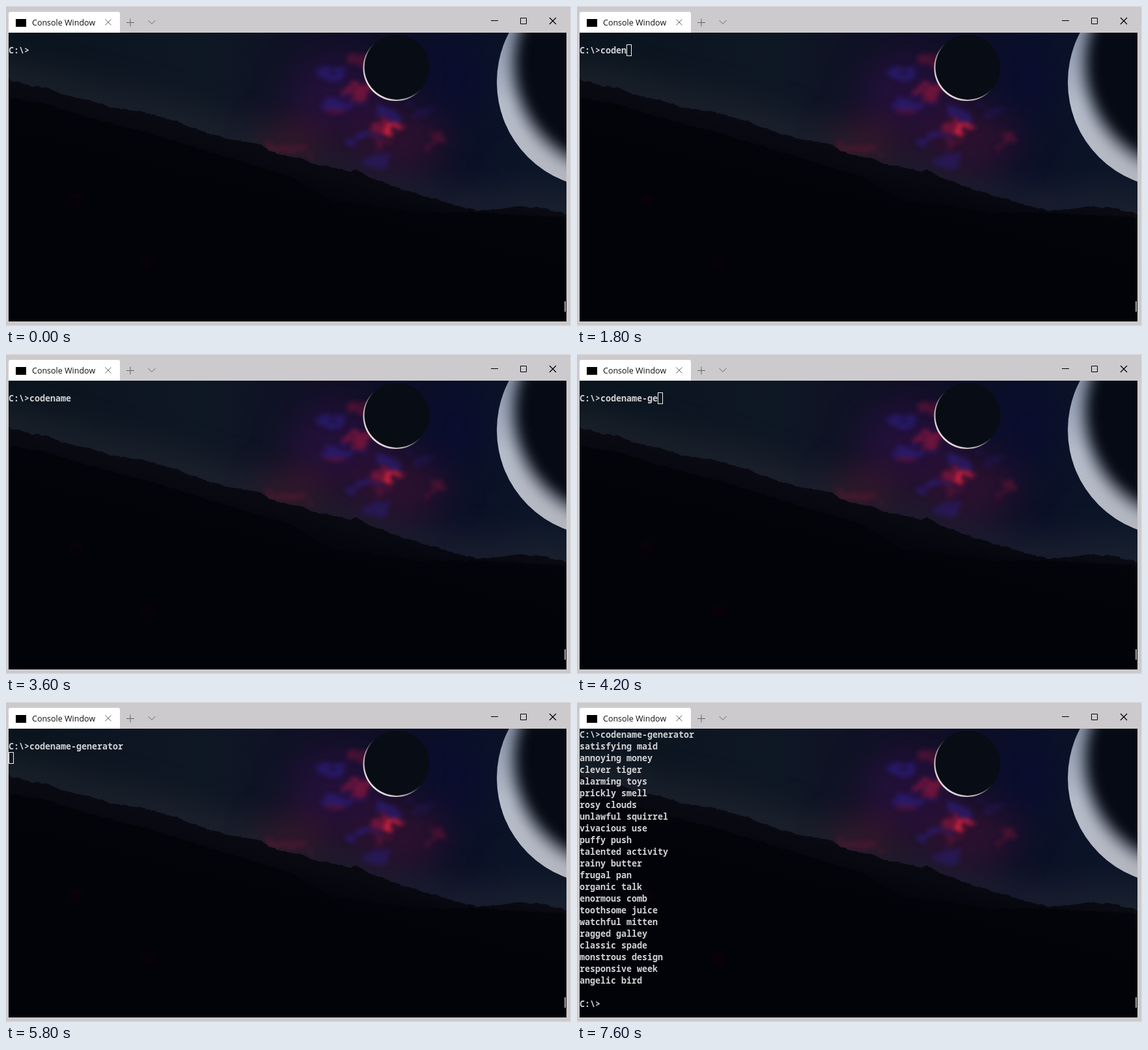
Recreate the animation shown at these times as an HTML page. Size 868 by 492 pixels, loop 8 s.

```html
<!DOCTYPE html>
<html lang="en">
<head>
<meta charset="utf-8">
<title>Terminal</title>
<style>
  html, body { margin: 0; width: 868px; height: 492px; overflow: hidden; background: #cdcacd; }
  svg, #screen { position: absolute; left: 0; top: 0; }
  filter { color-interpolation-filters: sRGB; }
  #screen {
    margin: 0; left: 4px; top: 41px; width: 857px; height: 444px; overflow: hidden;
    font: 600 13.333px/18px "Noto Sans Mono", "DejaVu Sans Mono", monospace;
    font-variant-ligatures: none; color: #d2d2d4;
  }
  #cursor {
    position: absolute; box-sizing: border-box; width: 8px; height: 18px;
    border: 1px solid #f4f4f4;
  }
  .tab { font: 12.5px "Open Sans", "Noto Sans", sans-serif; fill: #111; }
</style>
</head>
<body>
<svg width="868" height="492" viewBox="0 0 868 492">
  <defs>
    <clipPath id="view"><rect x="4" y="41" width="857" height="444"/></clipPath>
    <linearGradient id="sky">
      <stop offset="0" stop-color="#0a141e"/>
      <stop offset=".35" stop-color="#0e1724"/>
      <stop offset=".58" stop-color="#100f25"/>
      <stop offset=".78" stop-color="#0a0f27"/>
      <stop offset="1" stop-color="#0c1728"/>
    </linearGradient>
    <linearGradient id="land" gradientUnits="userSpaceOnUse" x1="430" y1="215" x2="402" y2="330">
      <stop offset="0" stop-color="#0a0a13"/>
      <stop offset=".5" stop-color="#05060d"/>
      <stop offset="1" stop-color="#020309"/>
    </linearGradient>
    <linearGradient id="planet" gradientUnits="userSpaceOnUse" x1="780" y1="41" x2="830" y2="270">
      <stop offset="0" stop-color="#8f9bb0"/>
      <stop offset=".45" stop-color="#b6bdca"/>
      <stop offset="1" stop-color="#b4b7c0"/>
    </linearGradient>
    <linearGradient id="rim" gradientUnits="userSpaceOnUse" x1="566" y1="130" x2="612" y2="84">
      <stop offset="0" stop-color="#e6dadc"/>
      <stop offset=".45" stop-color="#a89ca4"/>
      <stop offset=".8" stop-color="#0b0f18"/>
    </linearGradient>
    <clipPath id="disc"><circle cx="917" cy="117" r="163"/></clipPath>
    <filter id="soft" filterUnits="userSpaceOnUse" x="-100" y="-60" width="1070" height="600"><feGaussianBlur stdDeviation="26"/></filter>
    <filter id="shade" x="-20%" y="-20%" width="140%" height="140%"><feGaussianBlur stdDeviation="9"/></filter>
    <filter id="cloud" filterUnits="userSpaceOnUse" x="360" y="41" width="380" height="260">
      <feTurbulence type="fractalNoise" baseFrequency=".035 .06" numOctaves="4" seed="7"/>
      <feDisplacementMap in="SourceGraphic" scale="44" xChannelSelector="R" yChannelSelector="G"/>
      <feGaussianBlur stdDeviation="3.500"/>
    </filter>
    <filter id="rough" filterUnits="userSpaceOnUse" x="-10" y="90" width="890" height="420">
      <feTurbulence type="fractalNoise" baseFrequency=".09" numOctaves="2" seed="3"/>
      <feDisplacementMap in="SourceGraphic" scale="5" xChannelSelector="R" yChannelSelector="G"/>
    </filter>
    <path id="ridge" d="M-12 109L4 113 40 123 60 125 85 135 135 147 170 158 205 161 240 172 265 178 300 192 345 205 388 212 415 227 432 231 458 235 470 242 500 248 530 255 538 251 560 264 600 279 640 291 680 303 725 315 760 312 785 308 830 311 861 320 880 324V510H-12Z"/>
  </defs>

  <path d="M0 .5H868" stroke="#e0dee0"/>
  <path d="M867.5 0V492M0 491.5H868" stroke="#dedcde"/>
  <path d="M4 41V12q0-3 3-3H172q3 0 3 3V41Z" fill="#fff"/>
  <rect x="15" y="20" width="16" height="12" fill="#000"/>
  <text class="tab" x="40" y="30">Console Window</text>
  <g fill="none" stroke="#666">
    <path d="M152.500 20.500l9 9m0-9l-9 9M185 25.500h12M191 19.500v12M218.500 22l5.500 5.500 5.500-5.500"/>
    <path d="M745 22.500h11M790.500 18.500h9v9h-9Z" stroke="#000"/>
    <path d="M835 18l10 10m0-10l-10 10" stroke="#000" stroke-width="1.300"/>
  </g>

  <g clip-path="url(#view)">
    <rect x="4" y="41" width="857" height="444" fill="url(#sky)"/>
    <use href="#ridge" fill="none" stroke="#2c2e36" stroke-width="44" opacity=".6" filter="url(#soft)"/>
    <g filter="url(#soft)">
      <ellipse cx="510" cy="135" rx="75" ry="60" fill="#2a1040" opacity=".75"/>
      <ellipse cx="445" cy="205" rx="55" ry="30" fill="#45182a" opacity=".65"/>
      <ellipse cx="600" cy="205" rx="80" ry="50" fill="#361233" opacity=".75"/>
      <ellipse cx="690" cy="110" rx="50" ry="60" fill="#0b0d33" opacity=".6"/>
    </g>
    <g filter="url(#cloud)">
      <g fill="#2c2088" opacity=".6">
        <ellipse cx="502" cy="103" rx="30" ry="8"/>
        <ellipse cx="522" cy="152" rx="36" ry="6"/>
        <ellipse cx="548" cy="200" rx="30" ry="8"/>
        <ellipse cx="585" cy="165" rx="18" ry="7"/>
        <ellipse cx="640" cy="160" rx="22" ry="6" opacity=".5"/>
        <ellipse cx="570" cy="240" rx="16" ry="12" opacity=".7"/>
      </g>
      <g fill="#a01840" opacity=".6">
        <ellipse cx="538" cy="132" rx="22" ry="9"/>
        <ellipse cx="500" cy="160" rx="17" ry="5" opacity=".6"/>
        <ellipse cx="542" cy="84" rx="12" ry="8" opacity=".6"/>
        <ellipse cx="586" cy="182" rx="22" ry="9"/>
        <ellipse cx="570" cy="212" rx="14" ry="6" opacity=".5"/>
        <ellipse cx="663" cy="206" rx="18" ry="9" opacity=".6"/>
        <ellipse cx="432" cy="218" rx="32" ry="8" opacity=".4"/>
      </g>
      <ellipse cx="594" cy="184" rx="10" ry="5" fill="#e8243f"/>
    </g>

    <circle cx="599" cy="95.500" r="50.500" fill="url(#rim)"/>
    <circle cx="600.300" cy="94.200" r="49.700" fill="#080d15"/>

    <g clip-path="url(#disc)">
      <rect x="750" y="41" width="115" height="250" fill="url(#planet)"/>
      <circle cx="944" cy="92" r="172" fill="#343c4c" opacity=".5" filter="url(#shade)"/>
      <circle cx="946" cy="88" r="161" fill="#050a14" filter="url(#shade)"/>
    </g>

    <g filter="url(#rough)">
      <use href="#ridge" fill="url(#land)"/>
      <path d="M-12 138L60 150 130 172 210 193 290 217 370 242 440 263 475 285 500 300 560 306 640 318 725 318 880 326V510H-12Z" fill="#020308" opacity=".7"/>
    </g>
    <g fill="#180208" opacity=".25">
      <circle cx="107" cy="298" r="11"/>
      <circle cx="218" cy="395" r="11"/>
    </g>
    <path d="M859 454V470" stroke="#a6a6a8" stroke-width="2"/>
  </g>
</svg>
<pre id="screen"><span id="text"></span><i id="cursor"></i></pre>

<script>
const LOOP = 8000, ENTER = 5800, OUTPUT = 6000;
const PROMPT = 'C:\\>', COMMAND = 'codename-generator';
const words = `satisfying maid
annoying money
clever tiger
alarming toys
prickly smell
rosy clouds
unlawful squirrel
vivacious use
puffy push
talented activity
rainy butter
frugal pan
organic talk
enormous comb
toothsome juice
watchful mitten
ragged galley
classic spade
monstrous design
responsive week
angelic bird`;

// [start in ms, value] steps
const typed = [[0, 0], [1400, 1], [1600, 3], [1800, 5], [2000, 7], [2200, 8],
  [4000, 9], [4200, 11], [4400, 13], [4600, 14], [4800, 16], [5000, 17], [5200, 18]];
const blink = [[0, 0], [200, 1], [800, 0], [1400, 1], [2600, 0], [3200, 1],
  [3600, 0], [4000, 1], [6400, 0], [6800, 1], [7400, 0]];
const at = (steps, t) => steps.findLast(([start]) => start <= t)[1];

const text = document.getElementById('text');
const cursor = document.getElementById('cursor');

function screenText(t) {
  const line = PROMPT + COMMAND.slice(0, at(typed, t));
  if (t >= OUTPUT) return `${line}\n${words}\n\n${PROMPT}`;
  return '\n' + line + (t >= ENTER ? '\n' : '');
}

function draw(now) {
  const t = now % LOOP;
  const content = screenText(t);
  const lines = content.split('\n');
  if (text.textContent !== content) text.textContent = content;
  cursor.style.left = lines.at(-1).length * 8 + 'px';
  cursor.style.top = (lines.length - 1) * 18 + 'px';
  cursor.style.visibility = at(blink, t) ? 'visible' : 'hidden';
  requestAnimationFrame(draw);
}
draw(performance.now());
</script>
</body>
</html>
```
